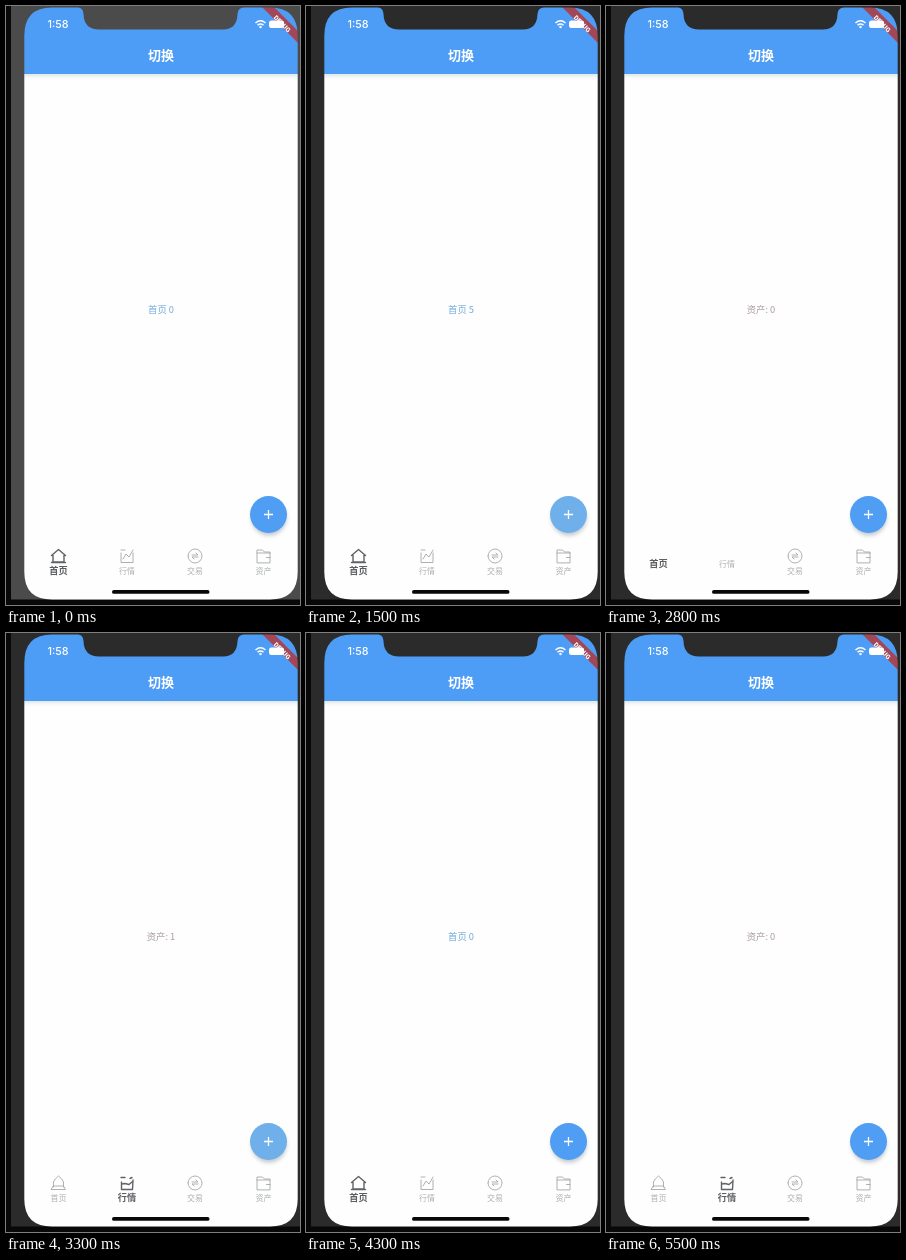
These frames come from a looping animation (294x599 px, 5.6 s). An HTML page:

```html
<!DOCTYPE html>
<html lang="zh">
<head>
<meta charset="utf-8">
<style>
html, body { margin: 0; width: 100%; height: 100%; overflow: hidden; background: #080808; }
svg { display: block; width: 100vw; height: 100vh; font-family: "Noto Sans CJK SC", "Noto Sans CJK", "Noto Sans", sans-serif; }
text { text-anchor: middle; dominant-baseline: central; }
.icon { fill: none; stroke-linejoin: round; stroke-linecap: round; }
</style>
</head>
<body>
<svg viewBox="0 0 294 599" preserveAspectRatio="none">
  <defs>
    <filter id="soft" x="-50%" y="-50%" width="200%" height="200%"><feGaussianBlur stdDeviation="2"/></filter>
    <filter id="edge"><feGaussianBlur stdDeviation=".5"/></filter>
    <mask id="screen" maskUnits="userSpaceOnUse" x="0" y="0" width="294" height="599">
      <path filter="url(#edge)" fill="#fff" d="M46 1.500H72Q77 1.500 77.500 8Q78 23.500 93 23.500H217Q231 23.500 231.500 8Q232 1.500 238 1.500H264Q291.700 1.500 291.700 30V566Q291.700 593.500 264 593.500H46Q18.300 593.500 18.300 566V30Q18.300 1.500 46 1.500Z"/>
    </mask>
  </defs>
  <rect width="294" height="599" fill="#080808"/>
  <rect id="body" x="5" width="289" height="593.500"/>
  <g mask="url(#screen)">
    <rect x="17" width="277" height="596" fill="#fefefe"/>
    <rect x="17" y="60" width="277" height="9.500" fill="#8aa" opacity=".35" filter="url(#soft)"/>
    <rect x="17" width="277" height="68" fill="#4d9df6"/>
    <text x="155" y="48.500" font-size="13" font-weight="600" fill="#fff">切换</text>
    <path d="M256 1H268L293 26V38Z" fill="#a9414d" opacity=".93"/>
    <text transform="translate(276 18) rotate(45)" font-size="6.500" font-weight="900" fill="#fff" font-family="Roboto, sans-serif">DEBUG</text>
    <text x="52" y="18.500" font-size="10.800" font-weight="500" fill="#fff" font-family="Inter, sans-serif">1:58</text>
    <g fill="none" stroke="#fff" stroke-width="1.500">
      <path d="M249.500 17Q254.500 12.500 259.500 17M251.500 19.200Q254.500 16.800 257.500 19.200"/>
      <circle cx="254.500" cy="21" r=".5"/>
    </g>
    <rect x="263" y="14.500" width="15" height="7.500" rx="2.500" fill="#fff"/>
    <text id="count" x="155" y="302.500" font-size="9.300" font-weight="500"/>
    <g id="tabs"></g>
    <circle cx="263" cy="512" r="17.500" fill="#506070" opacity=".35" filter="url(#soft)"/>
    <circle id="fab" cx="262.500" cy="508.500" r="18.500"/>
    <path d="M258 508.500H267M262.500 504V513" stroke="#fff" stroke-width="1.300"/>
    <rect x="106" y="584" width="97.500" height="3.800" rx="1.900" fill="#080808"/>
  </g>
</svg>
<script>
const LOOP = 5600, STEP = 100;
const byId = id => document.getElementById(id);

// Icon paths are centred on x = 0.
const tabs = [
  { label: "首页", x: 52.5,
    off: "M-5 554V549Q-4 546 0 543Q4 546 5 549V554M-7 556.500H7L5 553H-5Z",
    on: "M-7 549.500L0 543.500L7 549.500M-5.500 549V556H5.500V549M-7 556.500H7" },
  { label: "行情", x: 121,
    off: "M-6 544H-2M-6 547V556.500H6V547M-4 553L-1 548L2 551L6 544",
    on: "M-5.500 549V556.500H5.500L6 547M-5 551L-2 550.500L2 551.500L5 549M-6 544.500H-2M3 545.500L5 544.500" },
  { label: "交易", x: 189,
    off: "M-7 550A7 7 0 1 0 7 550A7 7 0 1 0 -7 550M-3 549H3L1 547M3 551H-3L-1 553" },
  { label: "资产", x: 257.5,
    off: "M-6.500 556.500V544H-1L1 546H6.500V556.500ZM-6.500 547H6.500M3 551.500H6.500" }
];

// Each visit has a page, a start, the first tap and the last tap.
const visits = [
  { start: 0, page: 0, first: 1100, last: 2000 },
  { start: 2700, page: 1, first: 3300, last: 4200 },
  { start: 4300, page: 0, first: LOOP, last: LOOP },
  { start: 5300, page: 1, first: LOOP, last: LOOP }
];

function tabMarkup(tab, index, page, loading) {
  const selected = index === page;
  const hidden = loading && index < 2;
  const dark = loading ? index === 0 : selected;
  const icon = hidden ? "" :
    `<path class="icon" transform="translate(${tab.x} 0)" d="${selected ? tab.on : tab.off}"
      stroke="${selected ? "#606266" : "#a5a7a9"}" stroke-width="${selected ? 1.4 : 0.9}"/>`;
  return icon + `<text x="${tab.x}" y="${hidden ? 557 : 564}" font-size="${dark ? 9.2 : 8}"
    font-weight="${dark ? 600 : 400}" fill="${dark ? "#5c5e62" : "#adafb1"}">${tab.label}</text>`;
}

let drawn = -1;
function draw(now) {
  const t = Math.floor(now % LOOP / STEP) * STEP;
  if (t !== drawn) {
    drawn = t;
    const visit = visits.findLast(v => v.start <= t);
    const { page, first, last } = visit;
    const taps = t < first ? 0 : (Math.min(t, last) - first) / STEP + 1;
    const loading = page === 1 && t - visit.start < 200;
    byId("body").setAttribute("fill", t === 0 ? "#4b4b4b" : "#2b2b2b");
    byId("count").textContent = page ? `资产: ${taps}` : `首页 ${taps}`;
    byId("count").setAttribute("fill", page ? "#ac9a9a" : "#6fa9dc");
    byId("fab").setAttribute("fill", t >= first && t <= last ? "#6fb0ea" : "#4f9ef3");
    byId("tabs").innerHTML = tabs.map((tab, i) => tabMarkup(tab, i, page, loading)).join("");
  }
  requestAnimationFrame(draw);
}
draw(0);
</script>
</body>
</html>
```
